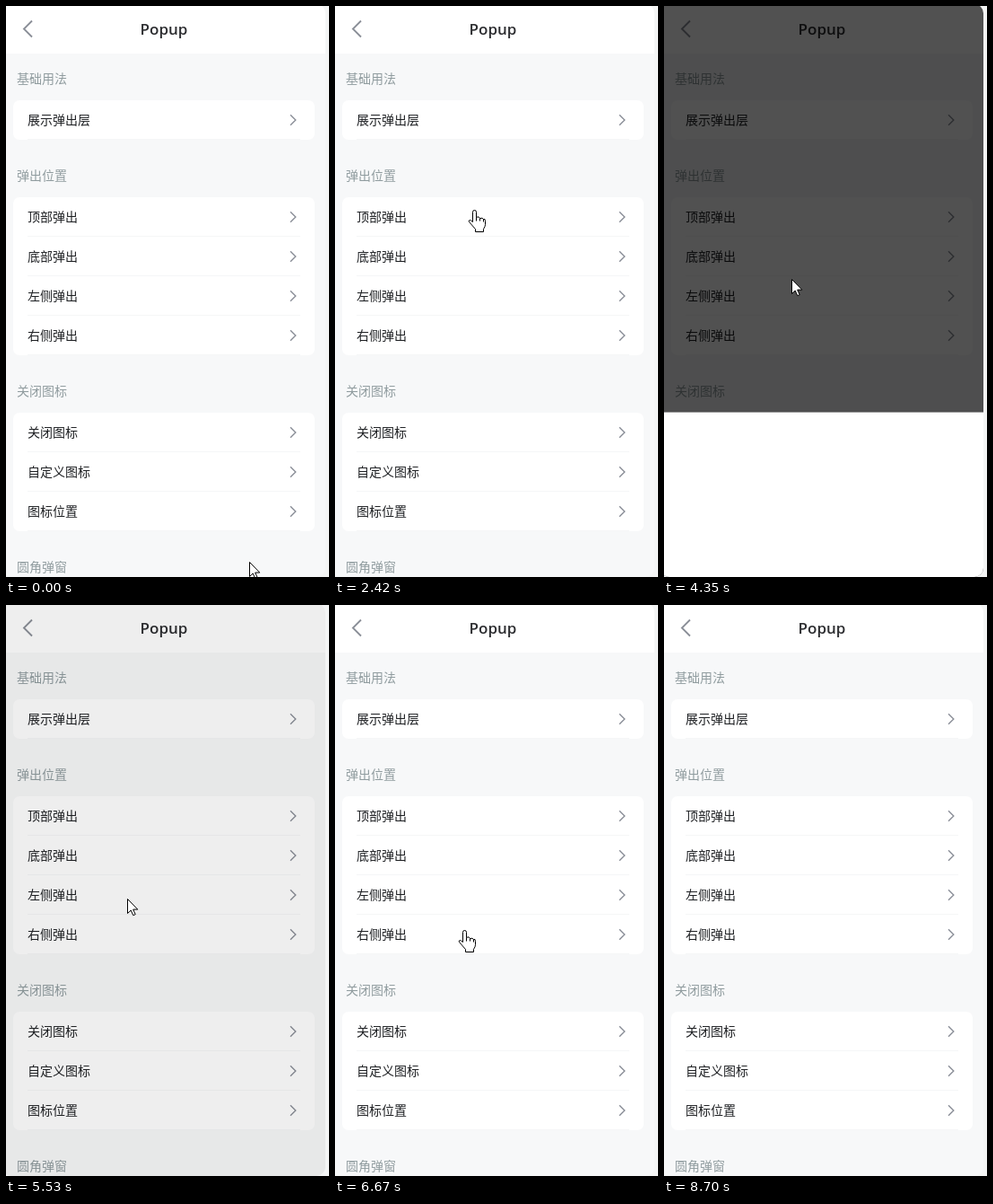
These frames come from a looping animation (360 by 636 pixels, 9.17 s). An HTML page:

```html
<!DOCTYPE html>
<html lang="zh-CN">
<head>
<meta charset="utf-8">
<title>Popup</title>
<style>
  html, body { margin: 0; width: 100%; height: 100%; overflow: hidden; background: #f4f5f5; }
  #stage { position: relative; width: 360px; height: 636px; overflow: hidden; }
  #app { position: absolute; inset: 0; background: #f7f8f9; clip-path: inset(-2px 4px 0 -4px round 10px);
    font: 14px/44px "Noto Sans CJK SC", "Noto Sans CJK", sans-serif; color: #1f2124; }
  #app > *, #cursor { position: absolute; }
  header { left: 0; top: 0; width: 352px; height: 53px; padding-right: 4px; background: #fff;
    font: 600 17px/52px "Open Sans", "Noto Sans", sans-serif; text-align: center; color: #2c2d30; }
  header svg { position: absolute; left: 18px; top: 15px; }
  h2 { margin: 0; left: 12px; font: inherit; line-height: 42px; color: #909c9f; }
  .card { left: 8px; width: 336px; background: #fff; border-radius: 7px; }
  .row { position: relative; height: 44px; padding-left: 16px; line-height: 42px; }
  .row::after { content: ""; position: absolute; left: 16px; right: 16px; top: 43px; height: 1px; background: #f5f6f7; }
  .row svg { position: absolute; left: 307px; top: 15px; }
  svg { fill: none; stroke: #8b8f98; }
  #shade { inset: -2px 0 0 -4px; background: #000; }
  .popup { background: #fff; }
  #center { left: 110px; top: 276px; width: 132px; height: 82px; font-size: 16px; line-height: 81px;
    text-align: center; color: #444; }
  #top, #bottom { left: -4px; width: 360px; height: 191px; }
  #left, #right { top: -2px; width: 108px; height: 638px; }
  #top { top: -2px; }
  #bottom { bottom: 0; }
  #left { left: -4px; }
  #right { right: 4px; }
  #cursor { left: 0; top: 0; overflow: visible; fill: #fff; stroke: #000; stroke-linejoin: round; }
</style>
</head>
<body>
<div id="stage">
  <div id="app">
    <header><svg width="13" height="21" stroke-width="1.9"><path d="M11 1.5 2 10.5l9 9"/></svg>Popup</header>
  </div>
  <svg id="cursor" width="20" height="26">
    <path id="arrow" d="M.5.5v16l3.7-3.5 2.6 5.7 2.4-1.1-2.5-5.5h5.1z"/>
    <path id="hand" transform="translate(-.5 -.5)" d="M-2 13V2q0-2 2-2t2 2v6q3-2 4 1 3-1 4 1 2-1 2 2v4q0 2-2 5v3H1v-3l-7-8q-1-2 1-2 1 0 3 2zM2 8v4M6 9v3M10 10v3"/>
  </svg>
</div>
<script>
const LOOP = 9170, FADE = 300, SLIDE_LAG = 15, FRAME = 77, PHASE = 45;
const $ = id => document.getElementById(id);
const app = $("app");

const groups = [
  [81, "基础用法", ["展示弹出层"]],
  [189, "弹出位置", ["顶部弹出", "底部弹出", "左侧弹出", "右侧弹出"]],
  [429, "关闭图标", ["关闭图标", "自定义图标", "图标位置"]],
  [625, "圆角弹窗", []]
];

// press: where the pointer opens the popup; rest: where it drifts while open
const popups = [
  { id: "center", open: 690, close: 1540, press: [154, 133], rest: [150, 137], away: [0, 0] },
  { id: "top", open: 2460, close: 3302, press: [156, 228], rest: [156, 225], away: [0, -1] },
  { id: "bottom", open: 4104, close: 4885, press: [141, 275], rest: [143, 330], away: [0, 1] },
  { id: "left", open: 5469, close: 6345, press: [134, 325], rest: [144, 362], away: [-1, 0] },
  { id: "right", open: 7110, close: 8115, press: [145, 364], rest: [140, 345], away: [1, 0] }
];
const enter = [271, 619], leave = [290, 660];

const chevron = '<svg width="11" height="14" stroke-width="1.4"><path d="M2 1.2 7.8 7 2 12.8"/></svg>';
const add = html => app.insertAdjacentHTML("beforeend", html);
for (const [y, title, rows] of groups) {
  const items = rows.map(r => `<div class="row">${r}${chevron}</div>`).join("");
  add(`<h2 style="top:${y - 22}px">${title}</h2>`);
  if (items) add(`<div class="card" style="top:${y + 24}px">${items}</div>`);
}
add('<div id="shade"></div>');
for (const { id } of popups) add(`<div class="popup" id="${id}">${id === "center" ? "内容" : ""}</div>`);

const clamp = v => Math.min(1, Math.max(0, v));
const mix = (a, b, k) => a.map((v, i) => v + (b[i] - v) * k);

// the CSS "ease" curve: cubic-bezier(.25, .1, .25, 1)
function ease(x) {
  if (x <= 0 || x >= 1) return clamp(x);
  const curve = (a, b, u) => 3 * a * u * (1 - u) ** 2 + 3 * b * u * u * (1 - u) + u ** 3;
  let lo = 0, hi = 1;
  for (let i = 0; i < 20; i++) {
    const mid = (lo + hi) / 2;
    if (curve(.25, .25, mid) < x) lo = mid; else hi = mid;
  }
  return curve(.1, 1, lo);
}

// travel to each press point after the previous popup starts closing, then drift
function pointer(t) {
  const travel = from => clamp((t - from - 50) / 430);
  let at = enter, from = -50;
  for (const { open, close, press, rest } of popups) {
    at = mix(at, press, travel(from));
    at = mix(at, rest, clamp((t - open) / 450));
    from = close;
  }
  return mix(at, leave, travel(from)).map(Math.round);
}

function draw(t) {
  let shade = 0;
  for (const { id, open, close, away } of popups) {
    const shown = lag => t < close ? ease((t - open - lag) / FADE) : 1 - ease((t - close) / FADE);
    const fade = shown(0), [dx, dy] = away.map(d => d * 100 * (1 - shown(SLIDE_LAG)));
    const style = $(id).style;
    shade = Math.max(shade, fade);
    style.visibility = fade > 0 ? "visible" : "hidden";
    style.opacity = id === "center" ? fade : 1;
    style.transform = `translate(${dx}%, ${dy}%)`;
  }
  $("shade").style.opacity = .7 * shade;

  const [x, y] = pointer(t);
  const overRow = groups.some(([top, , rows]) => y >= top + 24 && y < top + 24 + 44 * rows.length);
  const hand = overRow && shade === 0;
  $("cursor").style.transform = `translate(${x}px, ${y}px)`;
  $("hand").style.display = hand ? "" : "none";
  $("arrow").style.display = hand ? "none" : "";
}

// the picture advances about 13 times a second
const begin = performance.now();
function tick() {
  const t = (performance.now() - begin) % LOOP;
  draw(Math.floor((t + PHASE) / FRAME) * FRAME - PHASE);
  requestAnimationFrame(tick);
}
tick();
</script>
</body>
</html>
```
